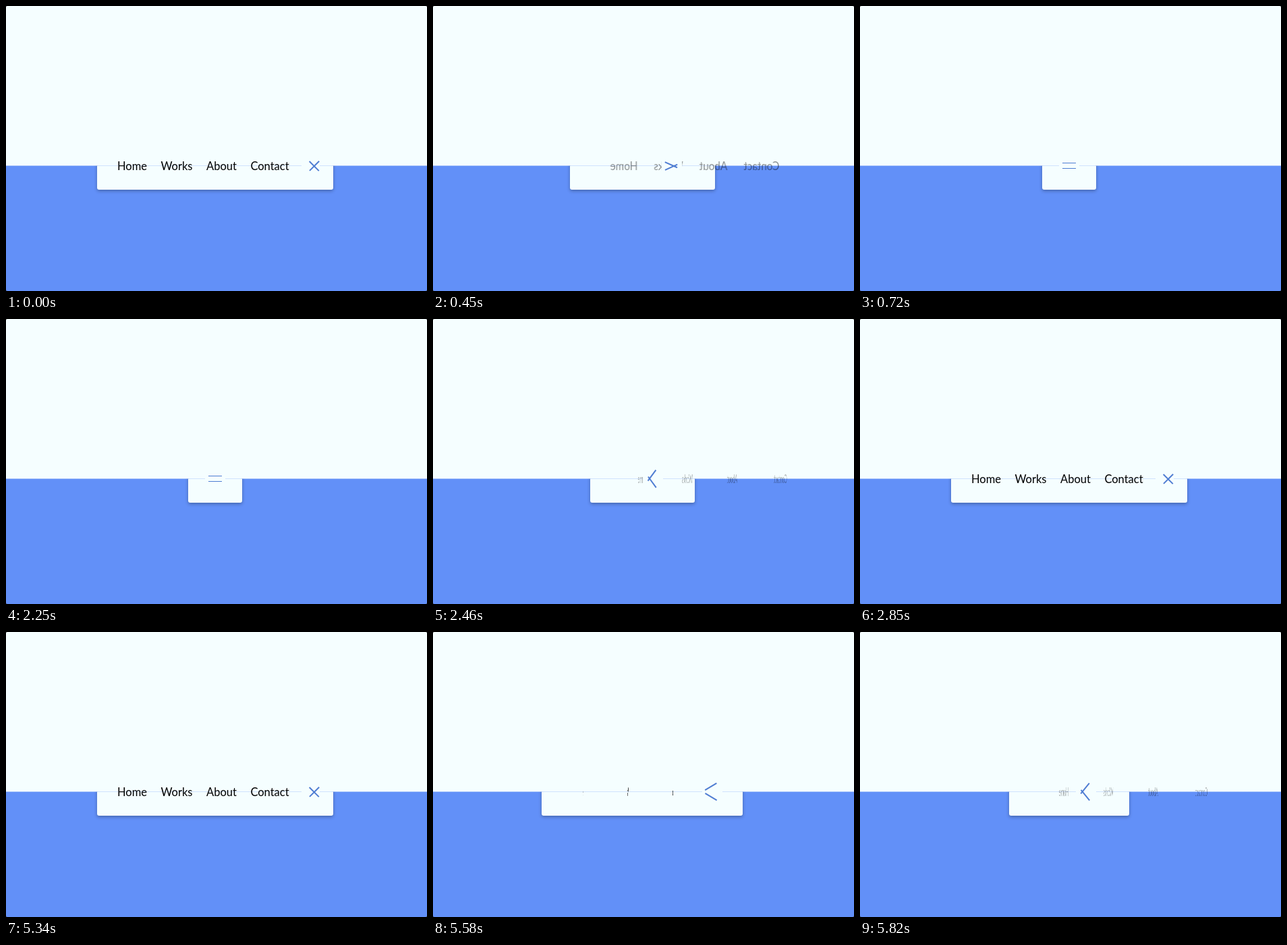
Write an HTML page that moves like this. It is 624x422 px and loops after 5850 ms.

```html
<!DOCTYPE html>
<html lang="en">
<head>
<meta charset="utf-8">
<title>Animated navigation</title>
<style>
  :root { --light: #f5feff; --blue: #6290f8; }
  html, body { margin: 0; width: 100%; height: 100%; overflow: hidden; }
  html { background: #444; }
  body {
    position: relative;
    border-radius: 2px;
    background: linear-gradient(var(--light) 236px, var(--blue) 237px);
    font: 16.5px Lato, sans-serif;
  }
  nav {
    position: absolute;
    top: 201.5px;
    height: 70px;
    padding: 0 20px;
    box-sizing: border-box;
    display: flex;
    align-items: center;
    justify-content: center;
  }
  /* the card and its shadow show only over the blue half */
  nav::before {
    content: "";
    position: absolute;
    inset: 0;
    border-radius: 3px;
    background: var(--light);
    box-shadow: 0 2px 5px rgba(0, 0, 0, .3);
    clip-path: inset(35px -10px -10px);
  }
  ul { display: flex; margin: 0; padding: 0; list-style: none; }
  li { flex: none; width: 64px; text-align: center; color: #000; }
  li:nth-child(2) { width: 68px; }
  li:nth-child(3) { width: 65px; }
  li:nth-child(4) { width: 78px; }
  .icon { position: relative; width: 30px; height: 30px; background: var(--light); }
  .icon i {
    position: absolute;
    left: 5px;
    top: 10.25px;
    width: 20px;
    height: 1.5px;
    background: #4f7dd2;
  }
  .icon i + i { top: auto; bottom: 10.25px; }
</style>
</head>
<body>
<nav>
  <ul><li>Home</li><li>Works</li><li>About</li><li>Contact</li></ul>
  <div class="icon"><i></i><i></i></div>
</nav>
<script>
const LOOP = 5850, STEP = 30, SPAN = 540;
const nav = document.querySelector("nav");
const list = document.querySelector("ul");
const items = document.querySelectorAll("li");
const lines = document.querySelectorAll(".icon i");

const ramp = (t, start) => Math.min(1, Math.max(0, (t - start) / SPAN));

// 1 = open, 0 = closed
const openness = t => 1 - ramp(t, 180) + ramp(t, 2310) - ramp(t, 5476);

function draw(t) {
  const size = openness(t);
  // turning runs slightly ahead of the layout
  const turn = openness(t + (t > 2000 && t < 3000 ? 15 : 33));
  const width = 80 + 270 * size;

  nav.style.width = width + "px";
  nav.style.left = 310 - width / 2 + "px";
  list.style.width = size * 100 + "%";
  for (const item of items) {
    item.style.opacity = turn;
    item.style.transform = `rotateY(${360 * turn}deg)`;
  }
  lines.forEach((line, i) => {
    const side = i ? 1 : -1;
    line.style.transform =
      `rotate(${765 * side * turn}deg) translateY(${-5.5 * side * turn}px)`;
  });
}

function tick() {
  const t = performance.now() % LOOP;
  draw(Math.floor(t / STEP) * STEP);
  requestAnimationFrame(tick);
}
tick();
</script>
</body>
</html>
```
